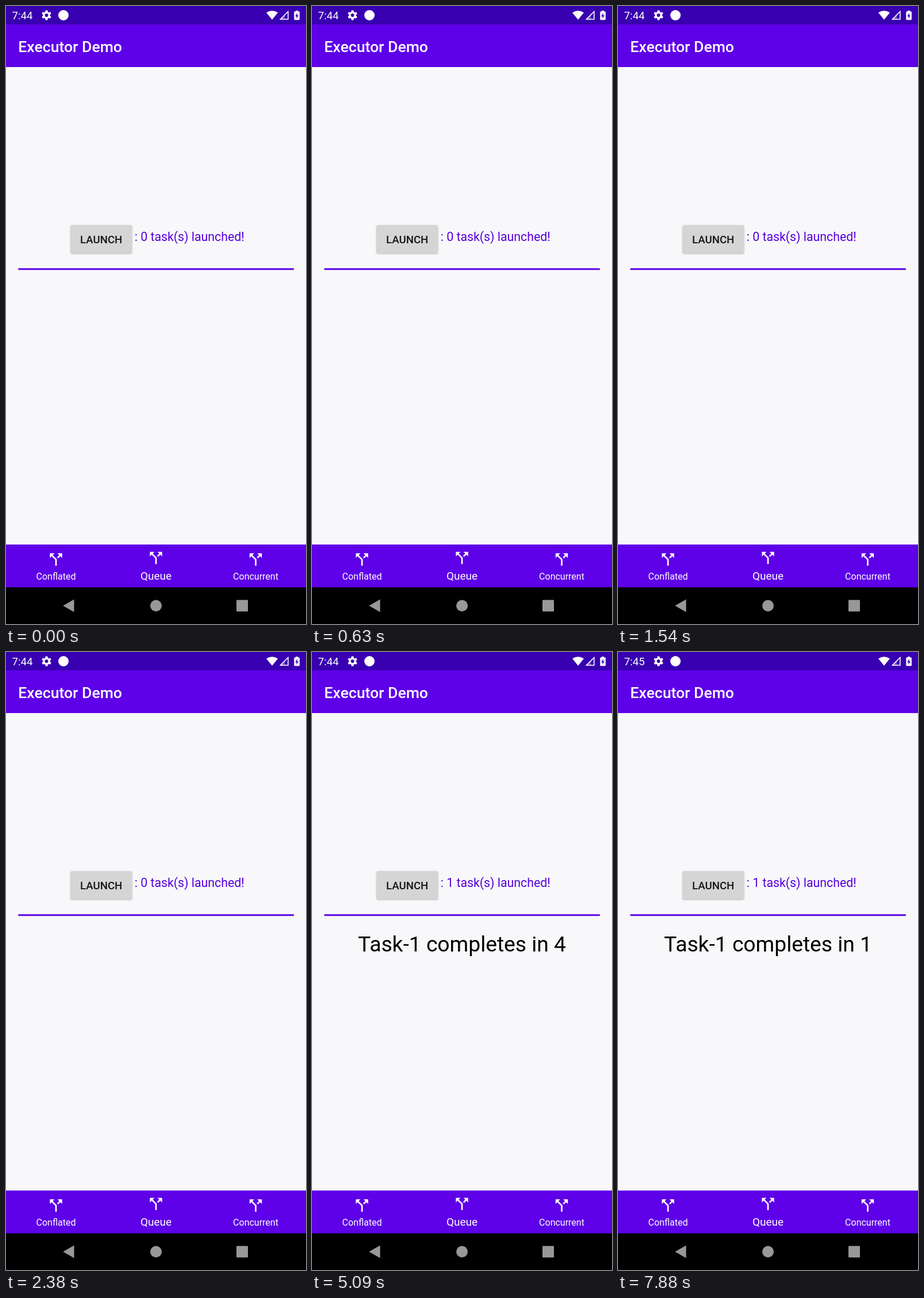
Recreate the animation shown at these times as an HTML page with a canvas. Size 522 by 1073 pixels, loop 8000 ms.

```html
<!DOCTYPE html>
<html lang="en">
<head>
<meta charset="utf-8">
<title>Executor Demo</title>
<style>
  html, body { margin: 0; width: 100%; height: 100%; overflow: hidden; background: #000; }
  canvas { display: block; width: 522px; height: 1073px; }
</style>
</head>
<body>
<canvas id="stage" width="522" height="1073"></canvas>
<script>
const ctx = document.getElementById('stage').getContext('2d');

const LOOP = 8000;
const PRESS_AT = 3250;
const LAUNCH_AT = 3340;
const RELEASE_AT = 3440;
const COUNT_FROM = 3380;
const COUNT_STEP = 1040;
const MINUTE_AT = 7000;

const PURPLE = '#5e00e8';
const STATUS = '#3800b1';
const SPLIT = new Path2D('M14 4l2.29 2.29-2.88 2.88 1.42 1.42 2.88-2.88L20 10V4zM10 4H4v6l2.29-2.29 4.71 4.7V20h2v-8.41l-5.29-5.3z');

const clamp = (v, lo = 0, hi = 1) => Math.min(hi, Math.max(lo, v));
const ramp = (t, start, length) => clamp((t - start) / length);

function rect(x, y, w, h, color) {
  ctx.fillStyle = color;
  ctx.fillRect(x, y, w, h);
}

function disc(x, y, r, color) {
  ctx.fillStyle = color;
  ctx.beginPath();
  ctx.arc(x, y, r, 0, 2 * Math.PI);
  ctx.fill();
}

function trace(...points) {
  ctx.beginPath();
  points.forEach(([x, y]) => ctx.lineTo(x, y));
  ctx.closePath();
}

function text(str, x, y, size, color, { weight = 400, align = 'left' } = {}) {
  ctx.font = `${weight} ${size}px Roboto, sans-serif`;
  ctx.textAlign = align;
  ctx.fillStyle = color;
  ctx.fillText(str, x, y);
}

function gear(x, y) {
  ctx.save();
  ctx.translate(x, y);
  disc(0, 0, 6.2, '#fff');
  for (let i = 0; i < 6; i++) {
    trace([-2.4, -5], [-1.8, -8.4], [1.8, -8.4], [2.4, -5]);
    ctx.fill();
    ctx.rotate(Math.PI / 3);
  }
  disc(0, 0, 2.9, STATUS);
  ctx.restore();
}

function wifi() {
  ctx.fillStyle = '#fff';
  ctx.beginPath();
  ctx.moveTo(463, 23.8);
  ctx.lineTo(453, 11.6);
  ctx.quadraticCurveTo(463, 4.8, 473, 11.6);
  ctx.closePath();
  ctx.fill();
}

function signal() {
  ctx.strokeStyle = '#fff';
  ctx.lineWidth = 1.6;
  trace([477.6, 23], [490.8, 23], [490.8, 9.8]);
  ctx.stroke();
  ctx.fillStyle = '#fff';
  trace([477, 23.5], [485.5, 23.5], [485.5, 15]);
  ctx.globalAlpha = 0.3;
  ctx.fill();
  ctx.globalAlpha = 1;
}

function battery() {
  ctx.fillStyle = '#fff';
  ctx.beginPath();
  ctx.roundRect(501.3, 9.6, 9.6, 14.6, 1.2);
  ctx.fill();
  ctx.fillRect(504, 8, 4.2, 2);
  ctx.fillStyle = STATUS;
  trace([507, 12], [503.2, 17.8], [505.6, 17.8], [505.2, 22], [509, 16.2], [506.6, 16.2]);
  ctx.fill();
}

function statusBar(t) {
  rect(0, 0, 522, 32, STATUS);
  text(t < MINUTE_AT ? '7:44' : '7:45', 10.5, 23, 18.6, '#fff');
  gear(70.5, 16);
  disc(100, 16, 9, '#fff');
  wifi();
  signal();
  battery();
}

function button(t) {
  const held = 1 - ramp(t, RELEASE_AT, 220);
  const lift = ramp(t, PRESS_AT, 100) * held;
  ctx.save();
  ctx.shadowColor = 'rgba(0,0,0,.3)';
  ctx.shadowBlur = 3 + 3 * lift;
  ctx.shadowOffsetY = 1 + lift;
  ctx.fillStyle = '#d5d5d6';
  ctx.beginPath();
  ctx.roundRect(112.5, 380.5, 106.5, 48.5, 2.6);
  ctx.fill();
  ctx.restore();

  const spread = ramp(t, PRESS_AT, 130);
  if (spread > 0 && held > 0) {
    ctx.save();
    ctx.clip();
    disc(166, 405, 20 + 42 * spread, `rgba(0,0,0,${0.13 * spread * held})`);
    ctx.restore();
  }
  text('LAUNCH', 165.7, 411.8, 18.6, '#151518', { weight: 500, align: 'center' });
}

function content(t) {
  const launched = t >= LAUNCH_AT;
  rect(0, 106, 522, 829, '#f8f8fb');
  button(t);
  text(`: ${launched ? 1 : 0} task(s) launched!`, 223.8, 408, 21.3, '#5500dc');
  rect(21.3, 455.3, 479.6, 3, PURPLE);
  if (launched) {
    const left = 5 - clamp(Math.floor((t - COUNT_FROM) / COUNT_STEP), 0, 4);
    text(`Task-1 completes in ${left}`, 261, 519.8, 37.23, '#000', { align: 'center' });
  }
}

function tab(label, x, iconY, size) {
  ctx.save();
  ctx.translate(x, iconY);
  ctx.scale(1.33, 1.33);
  ctx.translate(-12, -12);
  ctx.fillStyle = '#fff';
  ctx.fill(SPLIT);
  ctx.restore();
  text(label, x, 995.5, size, '#fff', { align: 'center' });
}

function bottomBars() {
  rect(0, 935, 522, 74.5, PURPLE);
  tab('Conflated', 87, 961, 16);
  tab('Queue', 261, 958.3, 19);
  tab('Concurrent', 434.5, 961, 16);

  rect(0, 1009.5, 522, 63.5, '#000');
  ctx.fillStyle = '#989898';
  trace([99.3, 1041.3], [118.5, 1030.3], [118.5, 1052.3]);
  ctx.fill();
  disc(261, 1041.3, 10, '#989898');
  ctx.beginPath();
  ctx.roundRect(401, 1031.3, 20, 20, 1.2);
  ctx.fill();
}

function draw(t) {
  statusBar(t);
  rect(0, 32, 522, 74, PURPLE);
  text('Executor Demo', 21.3, 80, 26.6, '#fff', { weight: 500 });
  content(t);
  bottomBars();
}

let start;
function frame(now) {
  start ??= now;
  draw((now - start) % LOOP);
  requestAnimationFrame(frame);
}
requestAnimationFrame(frame);
</script>
</body>
</html>
```
